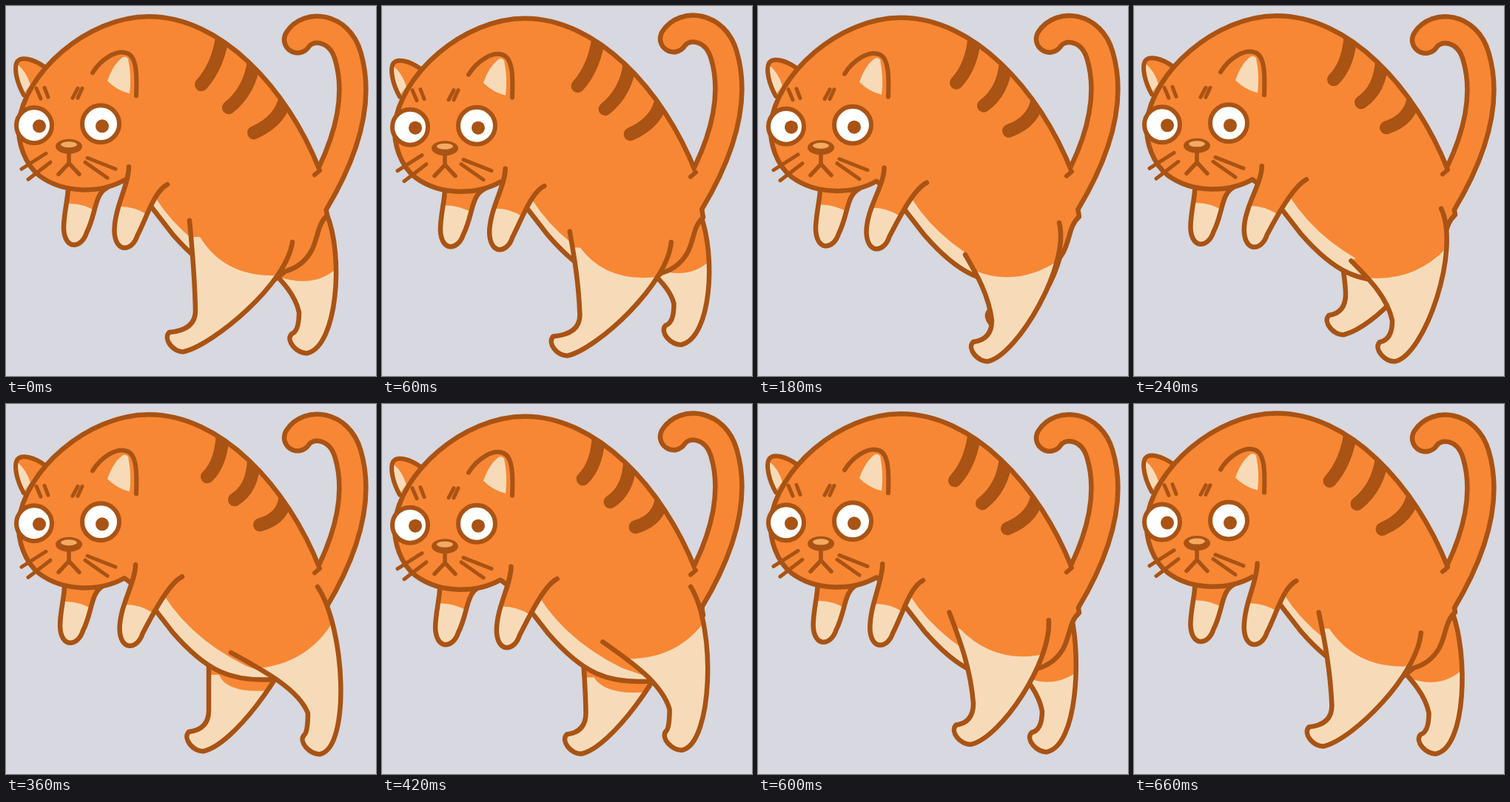
Write an HTML page with a canvas that moves like this. It is 500 px wide and 500 px high and loops after 720 ms.

```html
<!DOCTYPE html>
<html lang="en">
<head>
<meta charset="utf-8">
<title>Walking cat</title>
<style>
  html, body { margin: 0; width: 100%; height: 100%; overflow: hidden; background: #d7d8e0; }
  canvas { display: block; }
</style>
</head>
<body>
<canvas id="stage" width="500" height="500"></canvas>
<script>
const ctx = document.getElementById('stage').getContext('2d');
const SKY = '#d7d8e0', ORANGE = '#f78734', CREAM = '#f7dbb8', BROWN = '#a95314';
const STEP = 60, STEPS = 12, OUTLINE = 6.5;

const body = new Path2D(`M17 160C24 90 110 14 193 14C290 14 380 110 424 222L434 283
  C420 295 422 315 412 332Q400 352 378 358L360 372C305 375 272 362 225 308L180 250L160 235
  C130 252 80 255 45 229C25 213 16 185 17 160Z`);
const tail = new Path2D('M394 44C408 22 450 25 462 66C478 120 465 185 417 265');
const stripes = [
  { top: [293, 36], end: [264, 106] },
  { top: [335, 74], end: [301, 137] },
  { top: [378, 121], end: [335, 171] }
];

function fill(path, color) {
  ctx.fillStyle = color;
  ctx.fill(path);
}

function stroke(path, width = OUTLINE, color = BROWN) {
  ctx.strokeStyle = color;
  ctx.lineWidth = width;
  ctx.stroke(path);
}

function line(width, d) {
  stroke(new Path2D(d), width);
}

function ellipse(x, y, rx, ry = rx) {
  const path = new Path2D();
  path.ellipse(x, y, rx, ry, 0, 0, 2 * Math.PI);
  return path;
}

function clipped(path, draw) {
  ctx.save();
  ctx.clip(path);
  draw();
  ctx.restore();
}

// An orange limb that turns cream below the curve left - sag - right.
function limb(path, left, sag, right) {
  fill(path, ORANGE);
  clipped(path, () => fill(new Path2D(
    `M0 ${left[1]}L${left}Q${sag} ${right}H500V500H0Z`), CREAM));
  stroke(path);
}

// Arm hanging from its left and right shoulder points down to a round paw.
function arm([x0, y0], [x1, y1], [x, y]) {
  const h = y - 22 - y0;
  limb(new Path2D(`M${x0} ${y0}C${x0} ${y0 + 0.28 * h} ${x - 15} ${y - 22 - 0.37 * h} ${x - 15} ${y - 22}
    C${x - 14} ${y + 8} ${x + 9} ${y + 6} ${x + 16} ${y - 16}
    C${x + 29} ${y - 41} ${x1 - 18} ${y1 + 9} ${x1} ${y1}`),
    [x - 14, y - 55], [x + 10, y - 57], [x + 30, y - 44]);
}

// Leg from hip front to ankle, round the toe and up the calf to the hip back.
function leg({ front: [fx, fy], ankle: [ax, ay], toe, rear: [rx, ry], bulge, fur }) {
  const dx = ax - fx, dy = ay - fy;
  const tx = ax - 4 - 0.85 * toe, ty = ay + 29;
  const sx = ax + 18 - 0.9 * toe, sy = ay + 55;
  const left = [fx + 14, fy + fur.front], right = [rx + 0.6 * bulge, ry + fur.rear];
  limb(new Path2D(`M${fx} ${fy}
    C${fx + 0.4 * dx} ${fy + 0.28 * dy} ${ax - 0.12 * dx} ${ay - 0.4 * dy} ${ax} ${ay}
    C${ax} ${ay + 18} ${ax - 0.3 * toe - 2} ${ay + 27} ${tx} ${ty}
    C${tx - 9} ${ty + 9} ${sx - 14} ${sy + 2} ${sx} ${sy}
    C${sx + 40} ${sy - 10} ${rx + bulge} ${ry + 57} ${rx} ${ry}`),
    left, [(left[0] + right[0]) / 2 + bulge - 15, (left[1] + right[1]) / 2 + fur.sag], right);
}

function legs(turn) {
  const wave = (mean, cos, sin = 0, cos2 = 0, cos3 = 0) => mean + cos * Math.cos(turn)
    + sin * Math.sin(turn) + cos2 * Math.cos(2 * turn) + cos3 * Math.cos(3 * turn);
  const lift = wave(406, 0, -15, 8);
  return {
    near: {
      front: [wave(276, -28, 4), wave(313, -23, 23)],
      ankle: [wave(324, -70, 0, 8, -6), wave(415, -3, 10)],
      toe: wave(19, 18, 6),
      rear: [wave(404, -17, 3), wave(283, 36, 10)],
      bulge: wave(15, -23),
      fur: { front: 22, rear: 44, sag: 35 }
    },
    far: {
      front: [wave(314, 48, 0, 0, -8), 352],
      ankle: [wave(335, 71, -4, 0, -10), lift],
      toe: wave(17, -10),
      rear: [wave(414, 19), wave(295, -15)],
      bulge: wave(2, 22),
      fur: { front: lift - 400, rear: lift - 340, sag: 22 }
    }
  };
}

function eye(x, y, px, py, r) {
  const ball = ellipse(x, y, r);
  fill(ball, '#fff');
  stroke(ball, 6);
  fill(ellipse(px, py, 9), BROWN);
}

function face() {
  fill(new Path2D('M158 69Q145 78 137 101Q150 114 167 118Q170 95 165 71Q162 67 158 69Z'), CREAM);
  line(6, 'M117 90C128 72 150 57 165 64C177 70 177 95 176 121');
  line(5, 'M41 111L47 125M52 110L57 123M97 124L103 111M90 124L97 111');
  eye(38, 161, 45, 162, 24);
  eye(128, 159, 130, 162, 25);
  line(5, 'M21 220L54 199M30 234L60 211M110 205L148 220M107 211L137 232');
  line(5.5, 'M85 196V212L71 227M85 212L99 227');
  fill(ellipse(85, 189.5, 18, 10), BROWN);
  fill(ellipse(85, 187, 11, 4), '#f5a961');
}

function farEar() {
  const ear = new Path2D('M24 120C15 104 10 84 15 75C21 67 38 72 52 82');
  fill(ear, ORANGE);
  fill(new Path2D('M16 79Q27 88 33 106L24 118Q15 97 16 79Z'), CREAM);
  stroke(ear, 6);
}

function torso(sway) {
  fill(body, ORANGE);
  clipped(body, () => {
    const shift = -12 * (1 - sway);
    fill(new Path2D(`M${203 + shift} 240Q${240 + shift} 312 ${325 + shift} 354L365 368V400H180V240Z`), CREAM);
    for (const { top: [x, y], end: [ex, ey] } of stripes) {
      const s = 8 * sway;
      stroke(new Path2D(`M${x} ${y}Q${x - 5 + s / 2} ${(y + ey) / 2 + 8} ${ex + s} ${ey - s}`), 18);
    }
  });
  stroke(body);
}

function draw(step) {
  const turn = step / STEPS * 2 * Math.PI;
  const bob = 2.5 * Math.sin(2 * turn - 0.3) + 1;
  const sway = (1 - Math.cos(turn)) / 2;
  const swing = 5 - 5 * Math.cos(turn - Math.PI / 4);
  const { near, far } = legs(turn);
  const tailPart = (width, color) => {
    ctx.save();
    ctx.translate(0, -1.5 * bob + 1.5);
    stroke(tail, width, color);
    ctx.restore();
  };

  ctx.fillStyle = SKY;
  ctx.fillRect(0, 0, 500, 500);
  ctx.lineCap = ctx.lineJoin = 'round';

  leg(far);
  ctx.save();
  ctx.translate(0, bob);
  arm([85 - 0.7 * swing, 245], [138 - 0.7 * swing, 245], [94 - 0.7 * swing, 322]);
  farEar();
  tailPart(36 + OUTLINE, BROWN);
  torso(sway);
  tailPart(36 - OUTLINE, ORANGE);
  line(6, 'M424 222L417 228');
  face();
  arm([166 + 9 * sway, 217], [218 + 20 * sway, 241 - 8 * sway], [160 + swing, 326]);
  ctx.restore();
  leg(near);
}

function tick() {
  draw(Math.floor(performance.now() / STEP) % STEPS);
  requestAnimationFrame(tick);
}
tick();
</script>
</body>
</html>
```
